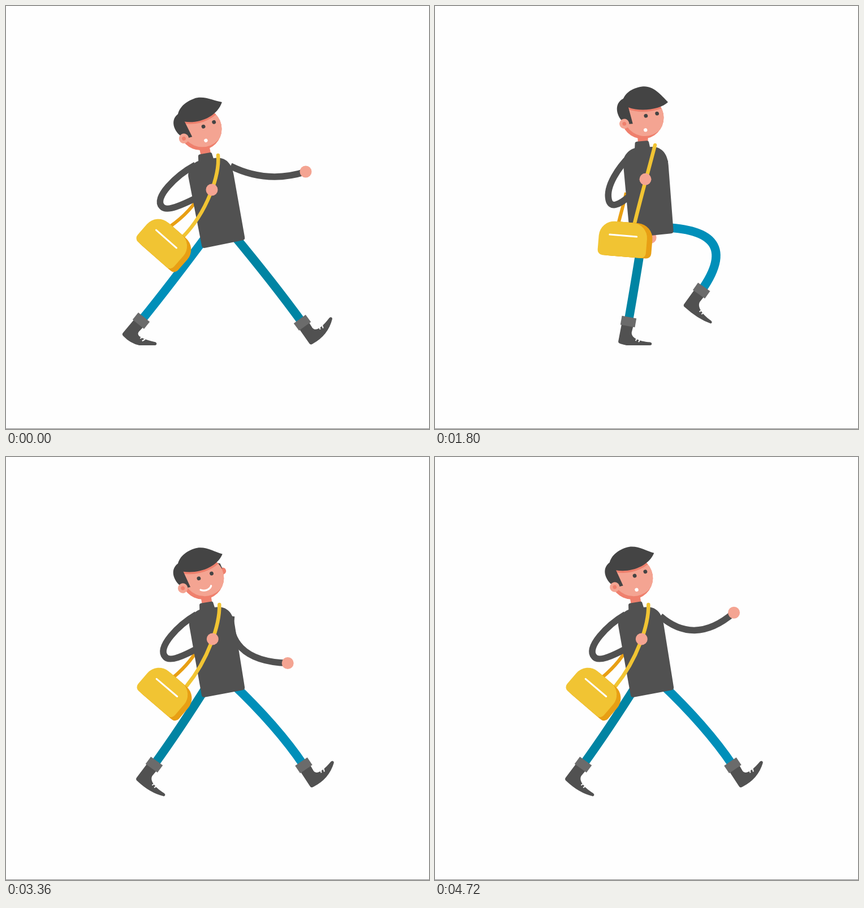
These frames come from a looping animation (748 by 748 pixels, 4.76 s). An HTML page with a canvas:

```html
<!DOCTYPE html>
<html>
<head>
<meta charset="utf-8">
<title>Walk</title>
<style>
html, body { margin: 0; width: 100%; height: 100%; overflow: hidden; background: #fefefe; }
canvas { display: block; }
</style>
</head>
<body>
<canvas id="stage" width="748" height="748"></canvas>
<script>
const ctx = document.getElementById('stage').getContext('2d');
const FRAME = 40, FRAMES = 119, STEP = 17, CYCLE = 2 * STEP, GROUND = 600;
const COLOR = {
  coat: '#515151', hair: '#444444', cuff: '#6b6b6b', skin: '#f4a492', blush: '#ef806d',
  bag: '#f1c433', bagSide: '#e89f14', nearLeg: '#008fb9', farLeg: '#0084a3', white: '#ffffff'
};

const lerp = (a, b, t) => a + (b - a) * t;
const mix = (a, b, t) => a.map((v, i) => lerp(v, b[i], t));
const clamp = (v) => Math.max(0, Math.min(1, v));
const smooth = (v) => clamp(v) ** 2 * (3 - 2 * clamp(v));
const rad = (deg) => deg * Math.PI / 180;
const wave = (t, period) => Math.cos(2 * Math.PI * t / period);

// Ankle positions and shin angle at a few moments of the walking cycle.
const strides = [
  { t: 0, x: 524, y: 560, shin: -36 },
  { t: 1, x: 495, y: 566, shin: -30 },
  { t: 5, x: 441, y: 560, shin: -17 },
  { t: 11, x: 342, y: 558, shin: 10 },
  { t: 16, x: 262, y: 544, shin: 36 },
  { t: 17, x: 239, y: 555, shin: 39 },
  { t: 18, x: 267, y: 537, shin: 53 },
  { t: 22, x: 329, y: 508, shin: 72 },
  { t: 28, x: 484, y: 484, shin: 35 },
  { t: 31, x: 571, y: 510, shin: -36 },
  { t: 33, x: 527, y: 540, shin: -34 }
];

// Smooth loop through the strides without overshoot.
function strideAt(t) {
  const n = strides.length;
  const key = (i) => {
    const turn = Math.floor(i / n), k = strides[i - turn * n];
    return { ...k, t: k.t + turn * CYCLE };
  };
  let i = 0;
  while (key(i + 1).t <= t) i++;
  const [a, b, c, d] = [key(i - 1), key(i), key(i + 1), key(i + 2)];
  const h = c.t - b.t, u = (t - b.t) / h;
  const tangent = (r, s) => r * s <= 0 ? 0 : 2 * r * s / (r + s);
  return ['x', 'y', 'shin'].map((k) => {
    const slope = (p, q) => (q[k] - p[k]) / (q.t - p.t);
    const s = slope(b, c);
    const m0 = tangent(slope(a, b), s), m1 = tangent(s, slope(c, d));
    return lerp(b[k], c[k], u * u * (3 - 2 * u)) + h * u * (1 - u) * (m0 * (1 - u) - m1 * u);
  });
}

function fillPath(d, color) {
  ctx.fillStyle = color;
  ctx.fill(new Path2D(d));
}
function circle(x, y, r, color) {
  ctx.fillStyle = color;
  ctx.beginPath();
  ctx.arc(x, y, r, 0, 7);
  ctx.fill();
}
// Points: x, y of the start, then three more pairs for each cubic.
function curve(points, width, color, cap = 'butt') {
  ctx.beginPath();
  ctx.moveTo(points[0], points[1]);
  for (let i = 2; i < points.length; i += 6) ctx.bezierCurveTo(...points.slice(i, i + 6));
  ctx.lineWidth = width;
  ctx.lineCap = cap;
  ctx.strokeStyle = color;
  ctx.stroke();
}
function line(x1, y1, x2, y2, width, color, cap = 'butt') {
  curve([x1, y1, x1, y1, x2, y2, x2, y2], width, color, cap);
}
function at(x, y, deg, draw) {
  ctx.save();
  ctx.translate(x, y);
  ctx.rotate(rad(deg));
  draw();
  ctx.restore();
}

function drawShoe(x, y, angle) {
  const a = rad(angle);
  // The toe bends up where the ground stops it.
  const toe = Math.min(32 + 0.18 * angle, (GROUND - y - 47 * Math.sin(a)) / Math.cos(a));
  ctx.save();
  ctx.beginPath();
  ctx.rect(0, 0, 748, GROUND);
  ctx.clip();
  at(x, y, angle, () => {
    fillPath(`M-11 4 L10 4 L9 18 C10 27 22 ${0.45 * toe + 16} 44 ${toe - 4.5}
      Q49 ${toe - 4} 47 ${toe} Q24 45 -7 41 Q-12 41 -11.5 36 Z`, COLOR.coat);
    for (const k of [0, 5.5]) {
      const laceY = 16 + 0.36 * toe + 0.25 * k;
      line(18.5 + k, laceY + 3, 20.5 + k, laceY - 3, 2, COLOR.white);
    }
    ctx.fillStyle = COLOR.cuff;
    ctx.fillRect(-13, -8, 26, 16);
  });
  ctx.restore();
}

function drawLeg(f, lift, near) {
  const t = f % CYCLE;
  let [x, y, shin] = strideAt(t);
  if (near) {
    // The near leg reaches and lifts a little less.
    x -= 8 * (1 - wave(t, STEP));
    y = lerp(561, y, 0.75);
  }
  const hipX = 379 + 21 * wave(t, CYCLE), hipY = 402 - 16 * lift;
  const chord = Math.atan2(hipX - x, y - hipY) * 180 / Math.PI;
  const bend = rad(shin - chord);
  const thigh = rad(chord - 0.75 * (shin - chord)), a = rad(shin);
  const handle = Math.hypot(x - hipX, y - hipY) / 3 / Math.cos(bend / 2) ** 2 *
    (1 + 0.45 * Math.sin(bend) ** 2);
  curve([hipX, hipY, hipX - handle * Math.sin(thigh), hipY + handle * Math.cos(thigh),
    x + handle * Math.sin(a), y - handle * Math.cos(a), x, y],
    15.5, near ? COLOR.nearLeg : COLOR.farLeg);
  drawShoe(x, y, shin);
}

function drawFarArm(f, lift) {
  const x = 397 + 14 * lift, y = 283 - 14 * lift;
  // Pendulum swing that stops in front while the hand is raised to greet.
  const reach = (1 + wave(Math.min(f, 3 * CYCLE), CYCLE)) / 2;
  const high = reach ** 3.5;
  const raise = f < 108 ? smooth((f - 77) / 14) : 1 - ((f - 108) / 11) ** 2;
  const swingX = 324 + 206 * reach - x, swingY = 411 - 118 * high - y;
  const angle = lerp(Math.atan2(swingY, swingX), rad(-48 + 12 * (1 - wave(f - 96, 10))), raise);
  const length = lerp(Math.hypot(swingX, swingY), 73, raise ** 2);
  const sag = lerp(28 * high - 10, 64, Math.sqrt(raise));
  const point = (along, across) => [
    x + along * Math.cos(angle) - across * Math.sin(angle),
    y + along * Math.sin(angle) + across * Math.cos(angle)
  ];
  const hand = point(length, 0), back = 42 * raise;
  curve([x, y, ...point(length / 3 - back, sag * (1 - 0.4 * raise)),
    ...point(length * 2 / 3 - back, sag * (1 + 0.4 * raise)), ...hand], 11.5, COLOR.coat);
  circle(...hand, 10.5, COLOR.skin);
}

function drawHead(x, y, angle, lift, turn) {
  at(x, y, angle, () => {
    const flick = 1 - lift / 0.78;
    const tipX = 49 + 4.5 * flick - 5 * turn, tipY = -16 - 13 * flick;
    const hairX = -5 * turn, lineX = -21 - 7 * turn;
    const fringe = `C${36 + hairX} -9 ${2 + hairX} -9 ${lineX} -23`;

    if (turn > 0.1) {
      circle(29 + 8.5 * turn, 1, 6, COLOR.blush);
      fillPath('M30 -18 L38 -13 L38.5 -3 L33 -8 Z', COLOR.hair);
    }
    ctx.save();
    ctx.beginPath();
    ctx.arc(0, 0, 37.5, 0, 7);
    ctx.clip();
    circle(0, 0, 38, COLOR.blush);
    circle(5, -4, 37.5, COLOR.skin);
    ctx.lineWidth = 7;
    ctx.strokeStyle = COLOR.blush;
    ctx.stroke(new Path2D(`M${tipX} ${tipY}${fringe}`));
    ctx.restore();

    fillPath(`M${-18 + hairX} -41 C${-43 + hairX} -41 ${-46 + hairX} -18 ${-37 + hairX} -2
      L${-27 + hairX} 6 L${-19 - 7 * turn} 7 L${lineX} -26 Z`, COLOR.hair);
    fillPath(`M${-31 + hairX} -30 C${-26 + hairX} -49 ${-7 + hairX} -55 ${10 + hairX} -54
      C${29 + hairX} -53 ${39 + 2 * flick + hairX} ${-34 - 2 * flick} ${tipX} ${tipY}
      ${fringe} Z`, COLOR.hair);
    const earX = -33.7 - 5.5 * turn;
    circle(earX, 4, 8.7, COLOR.skin);
    circle(earX, 4, 3.4, COLOR.blush);
    circle(6.4 - 13 * turn, -2, 3.4, COLOR.hair);
    circle(26.6 - 9 * turn, -2, 3.4, COLOR.hair);
    if (turn > 0.3) {
      const w = 7 + 3 * turn;
      curve([-1 - w, 18, -w / 2, 23.5, w / 2, 23.5, w - 1, 18], 3.2, COLOR.white, 'round');
    } else {
      circle(0.7, 22.4, 3.2, COLOR.white);
    }
  });
}

function drawTorso(x, y, angle, lift) {
  at(x, y, angle, () => {
    ctx.scale(1, 1 + 0.035 * lift);
    fillPath(`M0.5 -5 Q0.5 0 -4 0 L-72 1.5 Q-77 1.5 -77 -3 L-78.5 -126
      C-78.5 -140 -67 -150 -56 -152 L-55 -159 Q-55 -163 -51 -163 L-34 -163 Q-30 -163 -30 -159
      L-29 -152 C-8 -152 1 -138 1 -118 Z`, COLOR.coat);
  });
}

function drawBag(lift) {
  const swing = Math.max(0, lift - 0.1);
  at(283.5 + 87 * swing, 412 - 37 * Math.min(lift, 0.16), 41.3 - 64.5 * swing, () => {
    for (const [dx, color] of [[9.5, COLOR.bagSide], [5, COLOR.bagSide], [0, COLOR.bag]]) {
      ctx.fillStyle = color;
      ctx.beginPath();
      ctx.roundRect(-43 + dx, -24, 85.5, 61, [27, 27, 9, 9]);
      ctx.fill();
    }
    line(-24, 0, 24, 0, 3, COLOR.white, 'round');
  });
}

function draw(f) {
  const p = f % STEP;
  const lift = p < 8 ? p / 8 : (STEP - p) / 9;
  const sway = lift * 1.5;
  const turn = clamp(Math.min(f - 67, 114 - f) / 11);
  const baseX = 422.5 - 1.5 * lift, baseY = 413.5 - 17.5 * lift;
  const lean = -10.3 + 8.5 * lift;
  const headX = 344 + 34.5 * lift, headY = 217.5 - 30 * lift;

  ctx.fillStyle = '#fefefe';
  ctx.fillRect(0, 0, 748, 748);
  ctx.fillStyle = '#888888';
  ctx.fillRect(0, 747, 748, 1);

  drawLeg(f, lift, false);
  drawLeg(f + STEP, lift, true);
  drawFarArm(f, lift);

  // Back strap
  curve(mix([345, 330, 335, 350, 318, 370, 290, 390],
    [338, 330, 334, 350, 328, 368, 323, 390], sway), 6, COLOR.bagSide);

  at(baseX, baseY, lean, () => circle(-41, -158, 9, COLOR.coat));
  const a = rad(lean);
  line(baseX - 41 * Math.cos(a) + 160 * Math.sin(a), baseY - 41 * Math.sin(a) - 160 * Math.cos(a),
    headX, headY, 18, COLOR.blush);
  drawHead(headX, headY, -23 + 17 * lift, lift, turn);

  // Near arm
  curve(mix([335, 281, 300, 300, 260, 340, 276, 355, 284, 364, 310, 353, 345, 335],
    [345, 265, 325, 285, 302, 318, 307, 342, 310, 358, 325, 353, 345, 335], sway), 11.5, COLOR.coat);
  drawTorso(baseX, baseY, lean, lift);

  // Front strap
  curve(mix([375, 264, 378, 300, 355, 365, 313, 408],
    [389, 246, 380, 282, 366, 330, 352, 388], sway), 6.5, COLOR.bag, 'round');
  drawBag(lift);
  circle(364 + 12 * lift, 325 - 28 * lift, 10.5, COLOR.skin);
}

const start = performance.now();
function tick() {
  draw(Math.floor((performance.now() - start) / FRAME) % FRAMES);
  requestAnimationFrame(tick);
}
tick();
</script>
</body>
</html>
```
